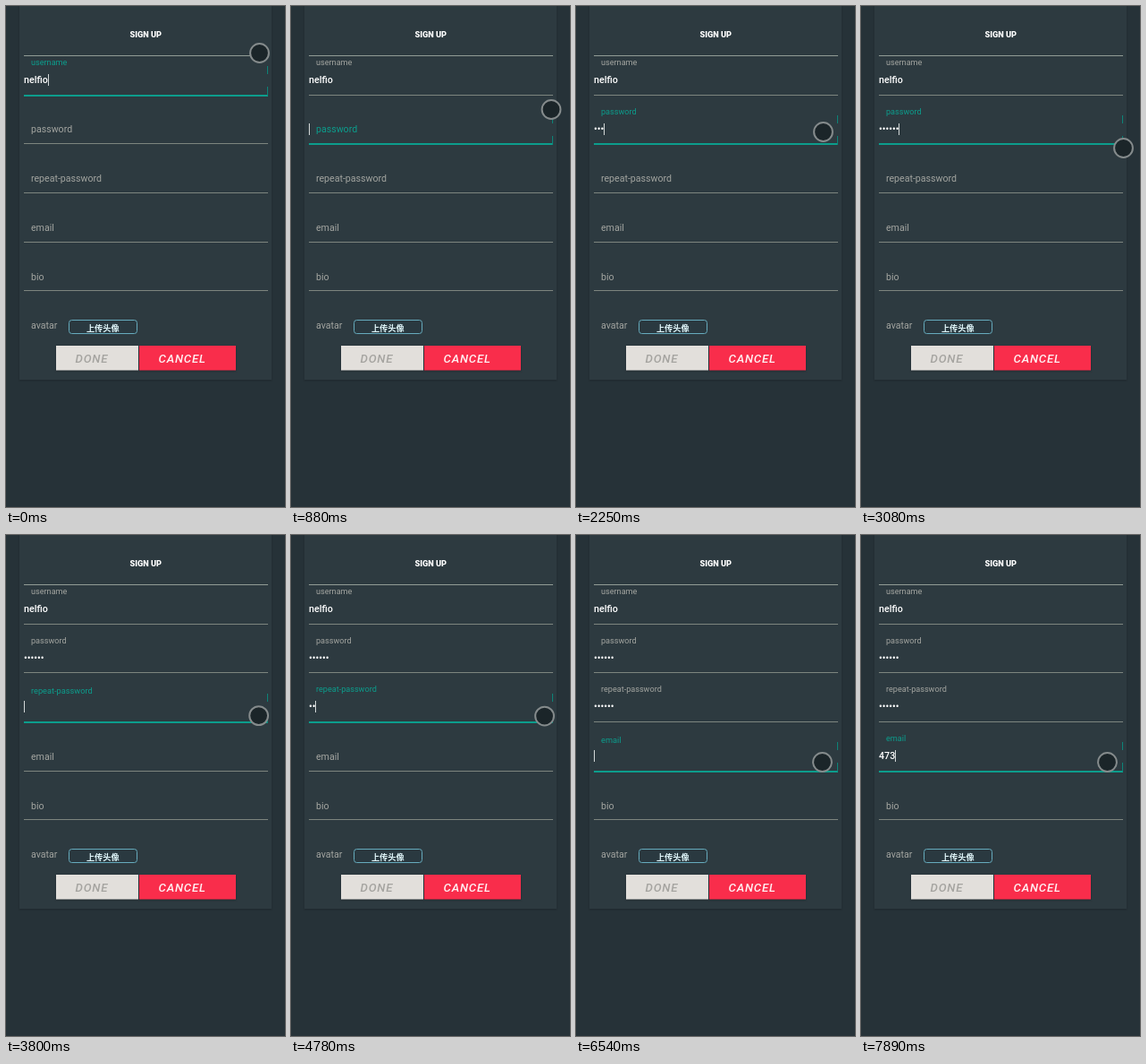
An HTML page for the animation above (8000 ms loop, 312 by 559 pixels).

```html
<!DOCTYPE html>
<html lang="en">
<head>
<meta charset="utf-8">
<title>Sign up form</title>
<style>
  html, body { margin: 0; width: 100%; height: 100%; overflow: hidden; background: #263238; }
  svg { display: block; width: 312px; height: 559px; font-family: Roboto, sans-serif; }
  .panel { fill: #2d3a40; filter: drop-shadow(0 1px 1px #0003); }
  .label { fill: #a3a5a0; font-size: 10.6px; }
  .value { fill: #fff; font-size: 10.7px; font-weight: 500; }
  .title { fill: #fff; font-size: 9.2px; font-weight: 800; text-anchor: middle; }
  .upload { fill: #e2f8fc; font: 700 9.2px "Noto Sans CJK SC", "Noto Sans CJK", sans-serif; text-anchor: middle; }
  .button { filter: drop-shadow(0 1px 1px #0004); }
  .action { font-size: 13.2px; font-style: italic; font-weight: 500; letter-spacing: .8px; }
  .line { fill: #7d857f; }
  .edge { stroke: none; stroke-dasharray: 9 14 10; }
  .focused .label, .focused .line { fill: #0c9d8c; }
  .focused .edge { stroke: #0c8478; }
</style>
</head>
<body>
<svg viewBox="0 0 312 559">
  <rect class="panel" x="15" y="-6" width="282" height="423"/>
  <text class="title" x="156.3" y="35">SIGN UP</text>
  <rect x="20" y="55" width="273" height="1" fill="#929c95"/>
  <g id="form"></g>
  <text class="label" x="28" y="360">avatar</text>
  <rect x="70.5" y="350.5" width="76" height="15" rx="3" fill="#2a3940" stroke="#66abbd"/>
  <text class="upload" x="108.3" y="362.5">上传头像</text>
  <rect class="button" x="56" y="379" width="92" height="27.5" fill="#e2dfdb"/>
  <text class="action" x="77.5" y="397.5" fill="#a5a4a0">DONE</text>
  <rect class="button" x="149" y="379" width="108" height="27.5" fill="#f92d4b"/>
  <text class="action" x="170.5" y="397.5" fill="#fff0f2">CANCEL</text>
  <rect id="caret" width="1" height="13" fill="#d3d8d8"/>
  <circle id="pointer" r="10.4" fill="#1b2529" stroke="#858b8c" stroke-width="2"/>
</svg>
<script>
const LOOP = 8000;
const STEP = 140;      // pointer and labels advance in steps of this length
const LABEL_MS = 400;
const BLINK_OFF = 6840;
const HIDDEN = '•'.repeat(6);

const fields = [
  { name: 'username', focus: -LABEL_MS, text: 'nelfio', typeFrom: -LOOP, keyMs: 0 },
  { name: 'password', focus: 840, text: HIDDEN, typeFrom: 1670, keyMs: 280 },
  { name: 'repeat-password', focus: 3500, text: HIDDEN, typeFrom: 4260, keyMs: 290 },
  { name: 'email', focus: 6160, text: '473', typeFrom: 7270, keyMs: 310 },
  { name: 'bio', focus: Infinity, text: '', typeFrom: Infinity, keyMs: 0 }
];

// Pointer stops: time, x, y.
const stops = [
  [0, 283.5, 52.5], [580, 300, 100], [1260, 276.5, 140.5], [2400, 276.5, 140.5], [2800, 293.5, 140.5],
  [3080, 293.5, 158.5], [3640, 282.5, 201.5], [5730, 284.5, 202.5], [6300, 275.5, 253.5]
];

const byId = id => document.getElementById(id);
const set = (node, attrs) => {
  for (const key in attrs) node.setAttribute(key, attrs[key]);
  return node;
};
const add = (parent, tag, attrs) =>
  parent.appendChild(set(document.createElementNS('http://www.w3.org/2000/svg', tag), attrs));
const mix = (a, b, p) => a + (b - a) * p;
const clamp = p => Math.max(0, Math.min(1, p));

fields.forEach((field, i) => {
  const y = field.lineY = 99.3 + 54.7 * i;
  field.group = add(byId('form'), 'g', {});
  field.line = add(field.group, 'rect', { class: 'line', x: 20, y: Math.floor(y - .3), width: 273 });
  add(field.group, 'path', { class: 'edge', d: `M292.5 ${Math.round(y) - 32}v33` });
  field.label = add(field.group, 'text', { class: 'label', x: 28 });
  field.label.textContent = field.name;
  field.value = add(field.group, 'text', { class: 'value', x: 20, y: Math.round(y - 13.3) });
});

function pointerAt(time) {
  const next = stops.findIndex(stop => stop[0] > time);
  const [t1, x1, y1] = stops.at(next);
  if (next < 0) return { cx: x1, cy: y1 };
  const [t0, x0, y0] = stops[next - 1];
  const p = (time - t0) / (t1 - t0);
  return { cx: mix(x0, x1, p), cy: mix(y0, y1, p) };
}

function drawField(field, time, stepped, focused) {
  const p = clamp((stepped - field.focus) / LABEL_MS);
  const eased = 1 - (1 - p) ** 2;
  set(field.label, { y: Math.round(mix(field.lineY - 12.6, field.lineY - 33.3, eased)) });
  field.label.style.fontSize = mix(10.6, 9.1, eased) + 'px';

  const typed = time < field.typeFrom ? 0
    : field.keyMs ? 1 + Math.floor((time - field.typeFrom) / field.keyMs) : field.text.length;
  field.value.textContent = field.text.slice(0, typed);

  set(field.group, { class: focused ? 'focused' : '' });
  set(field.line, { height: focused ? 2 : 1 });
}

function draw(time) {
  const stepped = Math.floor(time / STEP) * STEP;
  const active = fields.filter(field => field.focus <= stepped).pop();
  fields.forEach(field => drawField(field, time, stepped, field === active));
  set(byId('caret'), {
    x: Math.round(20 + active.value.getComputedTextLength()),
    y: Math.round(active.lineY - 23.3),
    opacity: time >= BLINK_OFF && time < active.typeFrom ? 0 : 1
  });
  set(byId('pointer'), pointerAt(stepped));
}

function loop() {
  draw(performance.now() % LOOP);
  requestAnimationFrame(loop);
}
loop();
</script>
</body>
</html>
```
